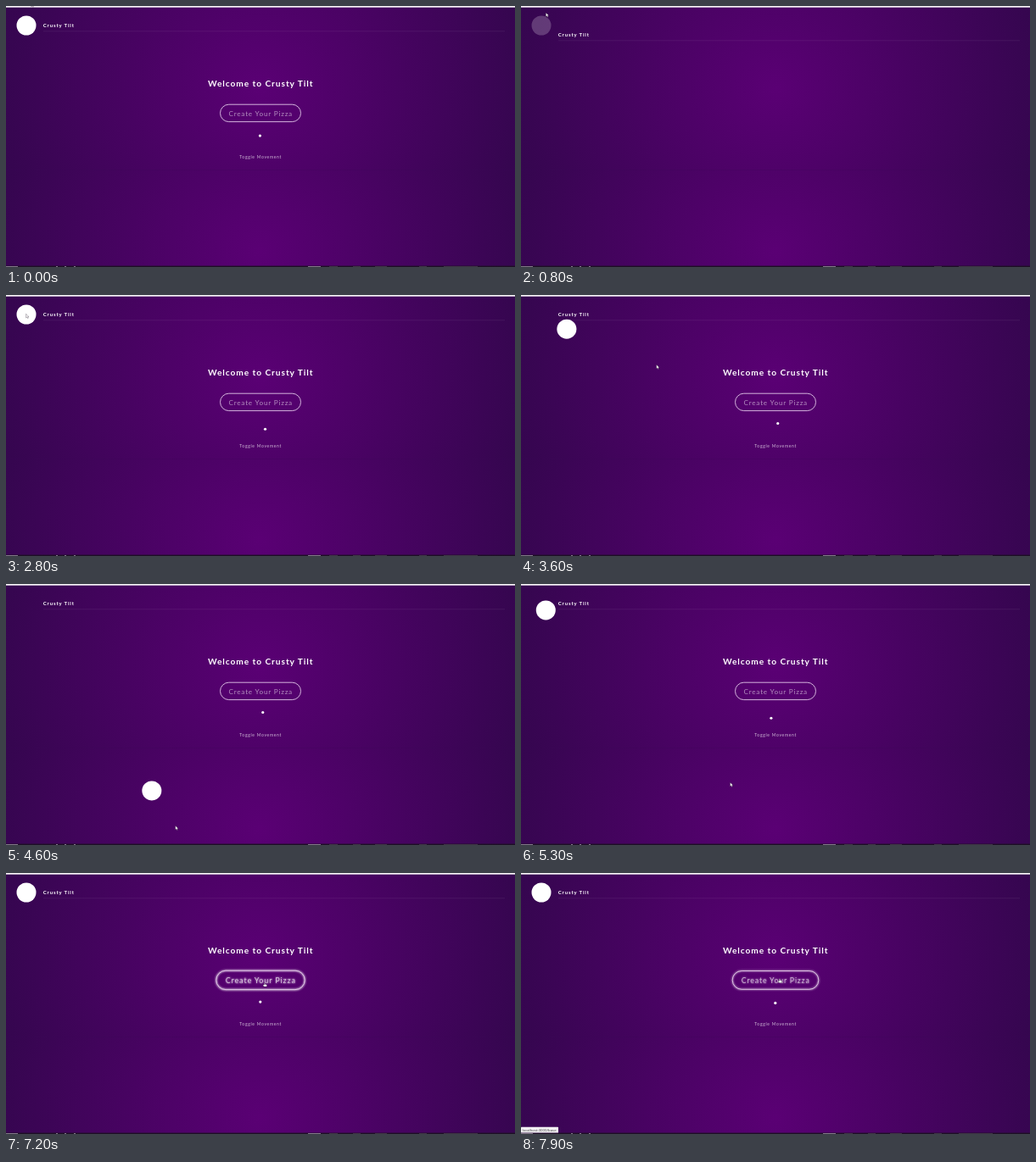
Write an HTML page that moves like this. It is 600 px wide and 308 px high and loops after 8000 ms.

```html
<!DOCTYPE html>
<html lang="en">
<head>
<meta charset="utf-8">
<title>Crusty Tilt</title>
<style>
  html, body { margin: 0; width: 100%; height: 100%; overflow: hidden; background: #3a0656; }
  svg { display: block; width: 100vw; height: 100vh; }
  text { font-family: Lato, "Open Sans", sans-serif; fill: #fff; }
  .mid { text-anchor: middle; }
</style>
</head>
<body>
<svg viewBox="0 0 600 308" preserveAspectRatio="none">
  <defs>
    <radialGradient id="bg" gradientUnits="userSpaceOnUse" cx="300" cy="96" r="315">
      <stop offset="0" stop-color="#5a0074"/>
      <stop offset="1" stop-color="#35064f"/>
    </radialGradient>
    <rect id="tile" width="600" height="192" fill="url(#bg)"/>
    <filter id="blur" x="-20%" y="-60%" width="140%" height="220%">
      <feGaussianBlur stdDeviation="1.2"/>
    </filter>
  </defs>

  <use href="#tile" y="1.6"/>
  <use href="#tile" y="193.6"/>

  <g id="header">
    <text x="43.8" y="25" font-size="6" font-weight="700" letter-spacing=".85">Crusty Tilt</text>
    <path d="M44 29.8H588" stroke="#fff" stroke-opacity=".11" stroke-width=".6"/>
  </g>

  <g id="home">
    <text class="mid" x="300.2" y="94.5" font-size="10.2" font-weight="700" letter-spacing=".93">Welcome to Crusty Tilt</text>
    <g id="button">
      <g id="glow" filter="url(#blur)">
        <rect x="-47.5" y="-10.2" width="95" height="20.4" rx="10.2" fill="none" stroke="#fff" stroke-width="1.4"/>
        <text class="mid" x=".4" y="3.1" font-size="8.2" letter-spacing=".78">Create Your Pizza</text>
      </g>
      <rect x="-47.5" y="-10.2" width="95" height="20.4" rx="10.2" fill="none" stroke="#e3c9e9" stroke-width=".9"/>
      <text id="label" class="mid" x=".2" y="3.1" font-size="8.2" letter-spacing=".78">Create Your Pizza</text>
    </g>
    <circle id="ball" r="1.6" fill="#fff"/>
    <text class="mid" x="300.2" y="179.7" font-size="5" letter-spacing=".7" opacity=".72">Toggle Movement</text>
  </g>

  <circle id="logo" cx="24" cy="23" r="11.5" fill="#fff"/>

  <rect width="600" height="1.7" fill="#f5f3f6"/>
  <rect y="306.6" width="600" height="1.4" fill="#1d1025"/>
  <path d="M0 307.6h14M59 307.6h2M69 307.6h2M80 307.6h2M356 307.6h15" stroke="#a79fad" stroke-width=".8"/>
  <path d="M381 307.6h10M409 307.6h9M435 307.6h14M487 307.6h9M516 307.6h40" stroke="#4b4450" stroke-width=".8"/>

  <g id="status">
    <rect y="299.8" width="44" height="6.8" rx=".6" fill="#f3f1f4"/>
    <text x="1.5" y="304.7" font-size="4.3" style="font-family:'Open Sans',sans-serif;fill:#444">localhost:3000/base</text>
  </g>

  <g id="cursor" stroke="#1c1022" stroke-width=".3" fill="#fff">
    <path id="arrow" d="M-.3 -1.7V2.9L.9 2 1.6 3.5 2.4 3.2 1.7 1.7H3.1Z"/>
    <path id="hand" d="M-.6 -2.2H.3V-.5L2.5 0V2.4H-1.2L-2.2 .4H-.6Z"/>
  </g>
</svg>
<script>
const DURATION = 8;
const RELOAD = 0.2, TOGGLE = 6.3125, HOVER = 6.89, STATUS = 7.35;
const GRIP = { x: 24, y: 24 };
const DRAGS = [[2.9, 3.34], [4.28, 4.7]];
const ELASTIC = 0.84;
const CURSOR = [
  [0, 30, -2], [.4, 30, -2], [1.4, 29, 31], [1.7, 29, 31], [2.6, 23.5, 24],
  [2.9, 24, 24], [3.34, 160, 102], [3.58, 160, 84], [3.65, 160, 84],
  [4.1, 24, 24], [4.28, 24, 24],
  [4.6, 200, 287], [4.75, 200, 287], [5.9, 300, 178], [6.4, 300, 178],
  [6.95, 305, 134], [7.6, 305, 127], [8, 305, 127]
];

const el = Object.fromEntries([...document.querySelectorAll('[id]')].map(n => [n.id, n]));
const clamp = p => Math.min(1, Math.max(0, p));
const smooth = p => p * p * (3 - 2 * p);
const easeOut = p => 1 - (1 - p) ** 2;
const mod = (a, n) => ((a % n) + n) % n;
const yoyo = (t, d) => 1 - Math.abs(mod(t / d, 2) - 1);
const show = (node, opacity) => node.setAttribute('opacity', opacity);
const place = (node, x, y, scale = 1) =>
  node.setAttribute('transform', `translate(${x} ${y}) scale(${scale})`);

function cursorAt(t) {
  const i = Math.max(1, CURSOR.findIndex(k => k[0] >= t));
  const [t0, x0, y0] = CURSOR[i - 1], [t1, x1, y1] = CURSOR[i];
  const p = smooth(clamp((t - t0) / (t1 - t0)));
  return { x: x0 + (x1 - x0) * p, y: y0 + (y1 - y0) * p };
}

// Overdamped return: stiffness 200, damping 40
const springBack = t => (34.14 * Math.exp(-5.86 * t) - 5.86 * Math.exp(-34.14 * t)) / 28.28;

function logoOffset(t) {
  const drag = DRAGS.filter(([start]) => t >= start).pop();
  if (!drag) return { x: 0, y: 0 };
  const c = cursorAt(Math.min(t, drag[1]));
  const k = ELASTIC * (t > drag[1] ? springBack(t - drag[1]) : 1);
  return { x: (c.x - GRIP.x) * k, y: (c.y - GRIP.y) * k };
}

// Underdamped drop-in: stiffness 120, damping 10
function headerY(t) {
  const s = Math.max(0, t - RELOAD - 0.2), w = 9.75;
  return -76 * Math.exp(-5 * s) * (Math.cos(w * s) + 5 / w * Math.sin(w * s));
}

function ballAt(t) {
  if (t >= TOGGLE) {
    const s = t - TOGGLE;
    return { x: 299.8 + 2 * (1 - clamp(s / .3)), y: 160.8 - 12.6 * easeOut(yoyo(s, .25)) };
  }
  const s = t < RELOAD ? t + .85 : t - .34;
  return {
    x: 293 + 12.6 * easeOut(yoyo(s, .5)),
    y: 161 - 9.5 * easeOut(yoyo(s, .25))
  };
}

function render(t) {
  const fresh = t >= RELOAD;
  place(el.header, 0, fresh ? headerY(t) : 0);
  show(el.home, fresh ? smooth(clamp((t - .9) / 1.25)) : 1);
  show(el.logo, fresh ? smooth(clamp((t - RELOAD) / 2)) : 1);

  const logo = logoOffset(t);
  place(el.logo, logo.x, logo.y);

  const ball = ballAt(t);
  place(el.ball, ball.x, ball.y);

  const pulse = t >= HOVER ? smooth(yoyo(t - HOVER, .3)) : 0;
  place(el.button, 300, 126.4, 1 + .1 * pulse);
  show(el.glow, pulse * .85);
  show(el.label, .55 + .15 * pulse);
  show(el.status, t >= STATUS ? 1 : 0);

  const c = cursorAt(t);
  const pointing = (t > 5.8 && t < 6.5) || t >= HOVER;
  place(el.cursor, c.x, c.y);
  show(el.arrow, pointing ? 0 : 1);
  show(el.hand, pointing ? 1 : 0);
}

const start = performance.now();
function tick() {
  render(((performance.now() - start) / 1000) % DURATION);
  requestAnimationFrame(tick);
}
tick();
</script>
</body>
</html>
```
